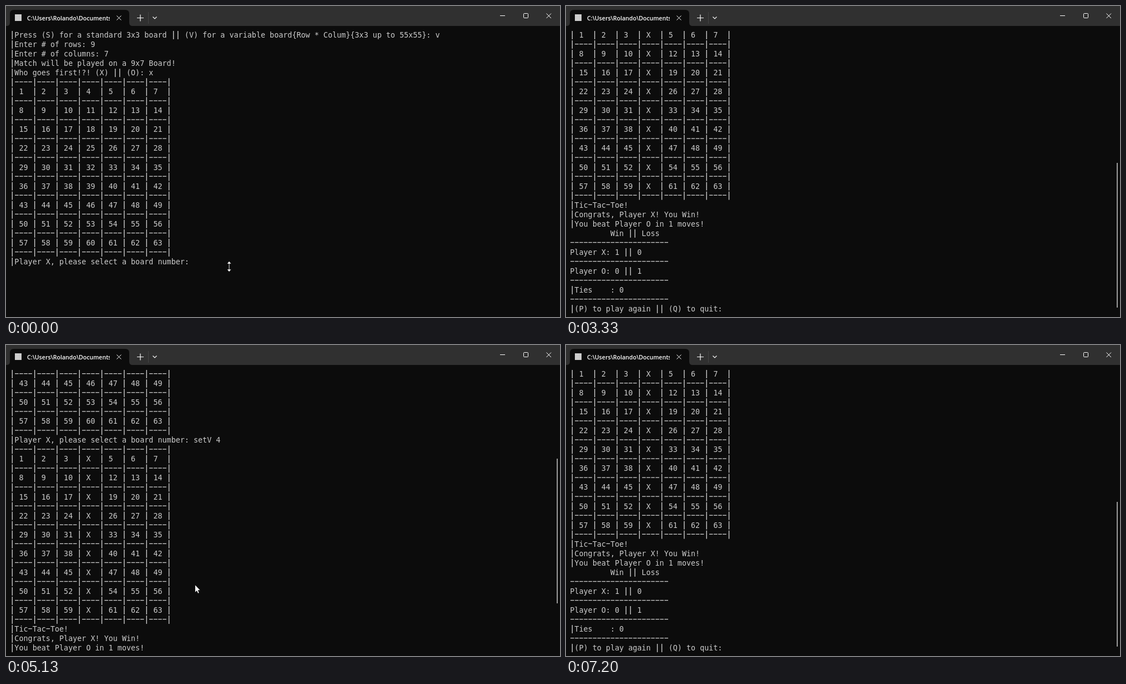
An HTML page with a canvas that plays this animation: 998 by 561 pixels, repeating every 7670 ms.

```html
<!DOCTYPE html>
<html lang="en">
<head>
<meta charset="utf-8">
<title>Terminal board game</title>
<style>
  html, body { margin: 0; width: 100%; height: 100%; overflow: hidden; background: #0c0c0c; }
  #stage { position: relative; width: 998px; height: 561px; overflow: hidden; }
  #stage > * { position: absolute; left: 0; top: 0; }
  #title {
    left: 38px; top: 13px; width: 149px; height: 18px; overflow: hidden;
    font: 600 10.6px/18px "Open Sans", "Noto Sans", sans-serif;
    color: #fff; white-space: nowrap;
  }
  .pointer { overflow: visible; visibility: hidden; }
</style>
</head>
<body>
<div id="stage">
  <canvas id="screen" width="998" height="561"></canvas>

  <svg width="998" height="36" fill="none" stroke="#fff" stroke-width="1">
    <rect width="998" height="36" fill="#303030" stroke="none"/>
    <path d="M1 36q6 0 6-6V14q0-7 7-7H215q7 0 7 7v16q0 6 6 6z" fill="#0c0c0c" stroke="none"/>
    <rect x="16" y="15" width="12" height="12" fill="#ccc" stroke="none"/>
    <path d="M199.5 17.5l8 8m0-8l-8 8"/>
    <path d="M236 21.5h12M242 15.5v12" stroke-width="1.2"/>
    <path d="M256.5 11v21" stroke="#444"/>
    <path d="M264.5 19.5l3.5 3.5 3.5-3.5" stroke-width="1.1"/>
    <path d="M890 17.5h9"/>
    <rect x="932.5" y="13.5" width="8" height="8" rx="1"/>
    <path d="M973.5 13.5l8.5 8.5m0-8.5l-8.5 8.5"/>
  </svg>
  <div id="title">C:\Users\Rolando\Documents</div>

  <svg id="arrow" class="pointer" width="12" height="18">
    <path d="M.5 .5v14l3.2-3 2.1 4.7 2.3-1-2-4.6h4z" fill="#fff" stroke="#000" stroke-width=".7"/>
  </svg>
  <svg id="resize" class="pointer" width="12" height="20">
    <path d="M0-9.5l4 4.5H.8V5H4L0 9.5-4 5H-.8V-5H-4z" fill="#fff" stroke="#000" stroke-width=".6"/>
  </svg>
</div>

<script>
const LOOP = 7670, ROWS = 30;
const LEFT = 7.3, TOP = 43, COL = 8.065, ROW = 17.04, BASE = 14;
const COMMAND = "setV 4";

const ctx = document.getElementById("screen").getContext("2d");
const pointers = {
  arrow: document.getElementById("arrow"),
  resize: document.getElementById("resize")
};

// Board of 9 x 7 cells; column `won` is filled with X
function board(won) {
  const border = "|----".repeat(7) + "|";
  const lines = [border];
  for (let r = 0; r < 9; r++) {
    let line = "";
    for (let c = 1; c <= 7; c++) {
      line += "| " + String(c === won ? "X" : r * 7 + c).padEnd(3);
    }
    lines.push(line + "|", border);
  }
  return lines;
}

const rule = "-".repeat(22);
const intro = [
  "|Press (S) for a standard 3x3 board || (V) for a variable board{Row * Colum}{3x3 up to 55x55}: v",
  "|Enter # of rows: 9",
  "|Enter # of columns: 7",
  "|Match will be played on a 9x7 Board!",
  "|Who goes first!?! (X) || (O): x",
  ...board()
];
const prompt = "|Player X, please select a board number: ";
const result = [
  ...board(4),
  "|Tic-Tac-Toe!",
  "|Congrats, Player X! You Win!",
  "|You beat Player O in 1 moves!",
  "         Win || Loss",
  rule, "Player X: 1 || 0",
  rule, "Player O: 0 || 1",
  rule, "|Ties    : 0",
  rule, "|(P) to play again || (Q) to quit: "
];

const at = (x, y, shape = "arrow") => ({ shape, x, y });

// Each step overrides part of the state from its time on
const steps = [
  [0, { typed: 0, done: false, top: 0, caret: false, mouse: at(402, 470, "resize") }],
  [400, { caret: true, mouse: at(402, 470) }],
  [930, { caret: false }],
  [1000, { typed: 1, caret: true }],
  [1070, { mouse: null }],
  [1130, { typed: 2 }],
  [1330, { typed: 3 }],
  [2000, { typed: 4 }],
  [2200, { typed: 5 }],
  [2800, { typed: 6 }],
  [3330, { done: true, top: 26, caret: false }],
  [3400, { caret: true }],
  [3930, { caret: false }],
  [4200, { mouse: at(400, 468) }],
  [4270, { mouse: at(388, 458) }],
  [4330, { mouse: at(370, 444) }],
  [4400, { mouse: at(353, 433) }],
  [4470, { mouse: at(345, 429), caret: true }],
  [4600, { mouse: at(342, 431) }],
  [4670, { top: 23 }],
  [4730, { mouse: at(340, 432) }],
  [4800, { top: 20 }],
  [5000, { caret: false }],
  [5130, { top: 17 }],
  [6000, { top: 20 }],
  [6130, { top: 23 }],
  [6270, { top: 26 }],
  [6670, { caret: true }],
  [6730, { mouse: at(339, 438) }],
  [6800, { mouse: at(335, 468) }],
  [6870, { mouse: null }],
  [7200, { caret: false }]
];

function drawLine(line, y) {
  [...line].forEach((ch, i) => {
    const mid = LEFT + (i + 0.5) * COL;
    if (ch === "|") ctx.fillRect(mid - 0.7, y - 12, 1.4, 15);
    else if (ch === "-") ctx.fillRect(mid - 3.3, y - 6, 6.6, 1.3);
    else if (ch !== " ") ctx.fillText(ch, mid, y);
  });
}

function draw(s) {
  const lines = [...intro, prompt + COMMAND.slice(0, s.typed), ...(s.done ? result : [])];
  ctx.fillStyle = "#0c0c0c";
  ctx.fillRect(0, 0, 998, 561);
  ctx.fillStyle = "#ccc";
  ctx.font = '13.4px "DejaVu Sans Mono", monospace';
  ctx.textAlign = "center";
  lines.slice(s.top, s.top + ROWS).forEach((line, r) => drawLine(line, TOP + BASE + r * ROW));

  const last = lines.length - 1;
  if (s.caret && last < s.top + ROWS) {
    const x = Math.round(LEFT + lines[last].length * COL);
    ctx.fillStyle = "#fff";
    ctx.fillRect(x, Math.round(TOP + (last - s.top) * ROW), 1, 17);
  }

  if (lines.length > ROWS) {
    const unit = 487 / lines.length;
    ctx.fillStyle = "#9c9c9c";
    ctx.fillRect(992, Math.round(57 + s.top * unit), 2, Math.round(ROWS * unit));
  }

  for (const [name, el] of Object.entries(pointers)) {
    const on = s.mouse && s.mouse.shape === name;
    el.style.visibility = on ? "visible" : "hidden";
    if (on) el.style.transform = `translate(${s.mouse.x}px, ${s.mouse.y}px)`;
  }
}

let shown = -1;
function tick() {
  const t = performance.now() % LOOP;
  const count = steps.filter(([start]) => start <= t).length;
  if (count !== shown) {
    shown = count;
    draw(Object.assign({}, ...steps.slice(0, count).map(([, patch]) => patch)));
  }
  requestAnimationFrame(tick);
}
tick();
</script>
</body>
</html>
```
